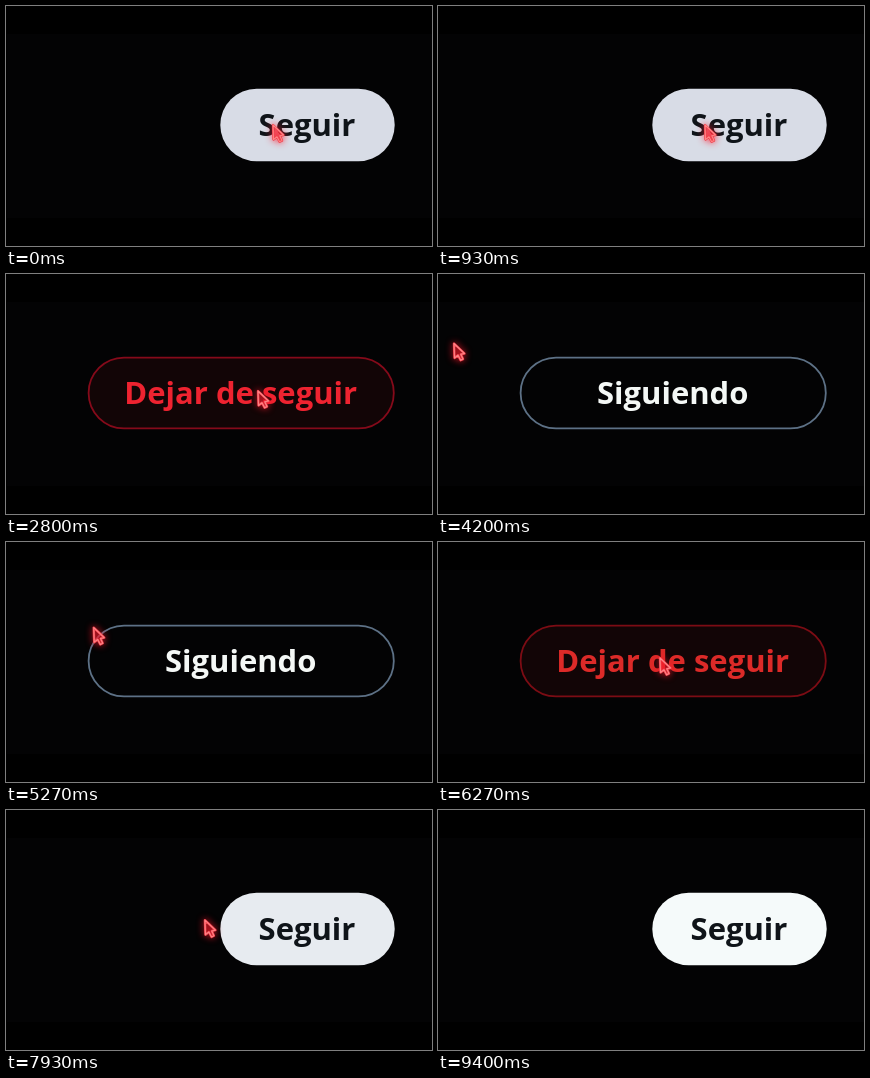
Recreate the animation shown at these times as an HTML page with a canvas. Size 426 px wide and 240 px high, loop 9.47 s.

```html
<!DOCTYPE html>
<html lang="es">
<head>
<meta charset="utf-8">
<title>Botón seguir</title>
<style>
  html, body { margin: 0; width: 100%; height: 100%; overflow: hidden; background: #000; }
  canvas { display: block; width: 426px; height: 240px; }
</style>
</head>
<body>
<canvas id="stage" width="426" height="240"></canvas>
<script>
const ctx = document.getElementById('stage').getContext('2d');
const LOOP = 9470;
const RIGHT = 388.7, TOP = 82.7, BOTTOM = 155.3;

const INK = '#0f1419', WHITE = [245, 250, 250], HOVER = [216, 220, 230];
const SLATE = '#5d7186', TINT = 'rgba(244, 33, 46, 0.06)';

// Cursor stops: time, x, y of the tip
const stops = [
  [0, 267, 119], [2000, 267, 119], [2500, 252, 117], [3250, 252, 117],
  [4200, 16, 69.5], [4850, 16, 69.5], [5800, 222, 116], [7600, 222, 116],
  [8750, -20, 55], [LOOP, -20, 55]
];

// Button states by start time
const states = [
  { at: 0, label: 'Seguir', left: 214.3, filled: true },
  { at: 950, label: 'Siguiendo', left: 158, filled: true },
  { at: 2200, label: 'Dejar de seguir', left: 81.7, text: '#ee2330', edge: '#850a1a', tint: TINT },
  { at: 3800, label: 'Siguiendo', left: 81.7, text: '#f4f8f6', edge: SLATE },
  { at: 5330, label: 'Dejar de seguir', left: 81.7, text: '#dc2a28', edge: '#7c0c14', tint: TINT },
  { at: 6900, label: 'Seguir', left: 214.3, filled: true }
];

const clamp = v => Math.max(0, Math.min(1, v));
const ease = p => p < 0.5 ? 4 * p ** 3 : 1 - 4 * (1 - p) ** 3;
const mix = (a, b, p) => a + (b - a) * p;
const blend = (a, b, p) => `rgb(${a.map((v, i) => Math.round(mix(v, b[i], p)))})`;

function cursorAt(t) {
  const i = Math.max(1, stops.findIndex(s => s[0] > t));
  const [t0, x0, y0] = stops[i - 1], [t1, x1, y1] = stops[i];
  const p = ease(clamp((t - t0) / (t1 - t0)));
  return [mix(x0, x1, p), mix(y0, y1, p)];
}

function drawButton(state, t) {
  const { label, left, filled } = state;
  const inset = filled ? 0 : 0.9;
  const width = RIGHT - left - inset * 2, height = BOTTOM - TOP - inset * 2;
  ctx.beginPath();
  ctx.roundRect(left + inset, TOP + inset, width, height, height / 2);
  if (filled) {
    ctx.fillStyle = blend(HOVER, WHITE, clamp((t - 7830) / 200));
    ctx.fill();
  } else {
    if (state.tint) {
      ctx.fillStyle = state.tint;
      ctx.fill();
    }
    ctx.strokeStyle = state.edge;
    ctx.lineWidth = 1.8;
    ctx.stroke();
  }
  ctx.fillStyle = filled ? INK : state.text;
  ctx.font = '700 31px "Open Sans", "Noto Sans", sans-serif';
  ctx.textAlign = 'center';
  ctx.fillText(label, (left + RIGHT) / 2 - 0.5, 130.3);
}

function drawCursor(x, y, onLight) {
  ctx.save();
  ctx.translate(x, y);
  ctx.beginPath();
  for (const [px, py] of [[0, 0], [0.5, 14.5], [4, 11.8], [6.6, 16.8], [9, 15.6], [6.8, 10.8], [10.5, 10]]) {
    ctx.lineTo(px, py);
  }
  ctx.closePath();
  ctx.lineJoin = 'round';
  ctx.fillStyle = `rgba(240, 45, 55, ${onLight ? 0.6 : 0.3})`;
  ctx.fill();
  ctx.shadowColor = '#ff1428';
  ctx.shadowBlur = 7;
  ctx.strokeStyle = '#f0404c';
  ctx.lineWidth = 2.4;
  ctx.stroke();
  ctx.shadowBlur = 0;
  ctx.strokeStyle = '#ff8486';
  ctx.lineWidth = 1.1;
  ctx.stroke();
  ctx.restore();
}

function draw(t) {
  ctx.fillStyle = '#000';
  ctx.fillRect(0, 0, 426, 240);
  ctx.fillStyle = '#030304';
  ctx.fillRect(1, 28, 425, 184);
  const state = states.filter(s => s.at <= t).pop();
  drawButton(state, t);
  const [x, y] = cursorAt(t);
  drawCursor(x, y, state.filled && x > state.left);
}

function tick() {
  draw(performance.now() % LOOP);
  requestAnimationFrame(tick);
}
tick();
</script>
</body>
</html>
```
